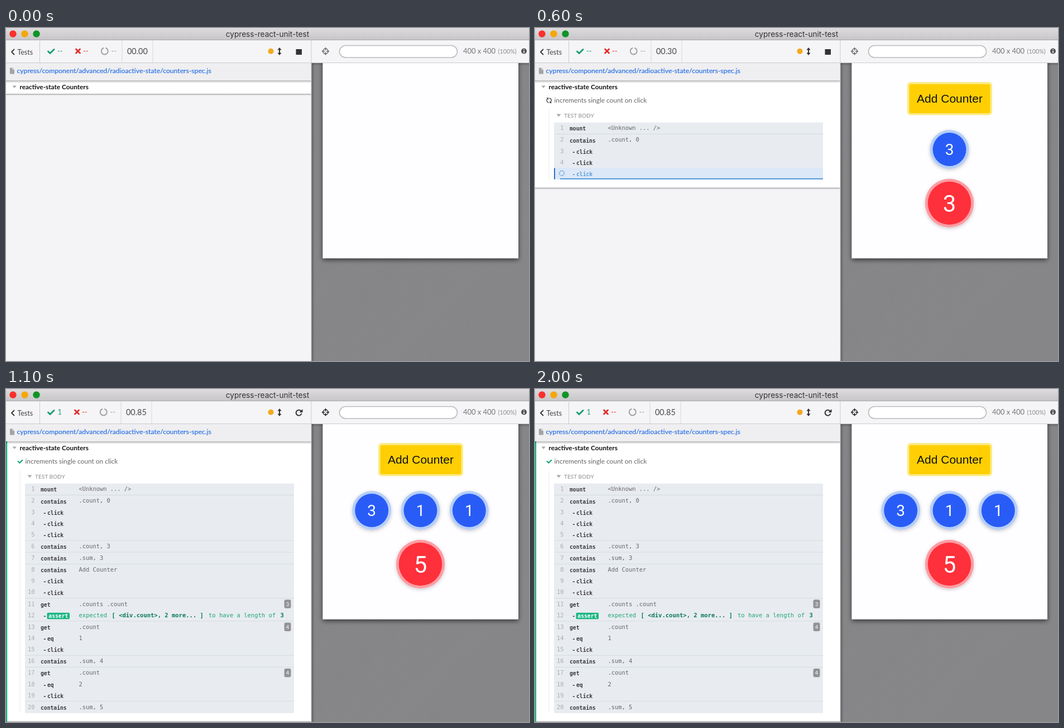
These frames come from a looping animation (937 px wide and 598 px high, 2100 ms). An HTML page:

```html
<!DOCTYPE html>
<html lang="en">
<head>
<meta charset="utf-8">
<title>Component test run</title>
<style>
  html, body { margin: 0; width: 100%; height: 100%; overflow: hidden; background: #f4f3f6; }
  svg { display: block; font-family: Lato, sans-serif; }
  .mono { font-family: "DejaVu Sans Mono", monospace; }
  .app { font-family: "Liberation Sans", Arial, sans-serif; }
  .digit { font-family: Roboto, sans-serif; }
  .title { font-family: Inter, sans-serif; }
  .bold { font-weight: 700; }
  .mid { text-anchor: middle; }
  .end { text-anchor: end; }
  .line { fill: none; stroke-linecap: round; stroke-linejoin: round; }
</style>
</head>
<body>
<svg width="937" height="598" viewBox="0 0 937 598">
  <defs>
    <linearGradient id="bar" x2="0" y2="1"><stop stop-color="#dedcde"/><stop offset="1" stop-color="#c6c4c6"/></linearGradient>
    <linearGradient id="fade" x2="0" y2="1"><stop stop-opacity=".28"/><stop offset="1" stop-opacity="0"/></linearGradient>
    <linearGradient id="side"><stop stop-opacity=".3"/><stop offset="1" stop-opacity="0"/></linearGradient>
    <pattern id="stripes" width="2.83" height="2.83" patternUnits="userSpaceOnUse" patternTransform="rotate(45)">
      <rect width="3" height="3" fill="#8f8e90"/><rect width="1.3" height="3" fill="#7b7a7c"/>
    </pattern>
    <filter id="soft" x="-20%" y="-20%" width="140%" height="140%"><feDropShadow dx="0" dy="2" stdDeviation="3" flood-opacity=".2"/></filter>
    <filter id="deep" x="-10%" y="-10%" width="120%" height="120%"><feDropShadow dx="0" dy="3" stdDeviation="4" flood-opacity=".6"/></filter>
  </defs>
  <rect width="937" height="598" fill="#f4f3f6"/>
  <rect x="547" y="62" width="390" height="536" fill="url(#stripes)"/>
  <rect x="547" y="62" width="6" height="536" fill="url(#side)"/>
  <rect x="547" y="62" width="390" height="6" fill="url(#fade)"/>
  <rect x="567.5" y="50" width="350.5" height="363.5" fill="#fefdff" filter="url(#deep)"/>
  <g id="log"></g>
  <rect y="63" width="546.5" height="31" fill="#efeef0"/>
  <rect y="94" width="546.5" height="5" fill="url(#fade)"/>
  <path d="M7 71.5h5l3 3v8H7z" fill="#a2a1a3"/><path d="M12 71.5v3h3" stroke="#efeef0" fill="none"/>
  <text x="19.5" y="81" font-size="12.2" fill="#2770e6" stroke="#2770e6" stroke-width=".2">cypress/component/advanced/radioactive-state/counters-spec.js</text>

  <rect y="22" width="937" height="40.5" fill="#f5f4f6"/>
  <path d="M0 62.5H937M60.5 23V62M547 22V598" stroke="#cbcacc"/>
  <rect width="937" height="22" fill="url(#bar)"/>
  <path d="M0 21.5H937" stroke="#aaa8aa"/>
  <circle cx="12.5" cy="10.5" r="6.2" fill="#fb2f2b"/>
  <circle cx="33.5" cy="10.5" r="6.2" fill="#f5a70a"/>
  <circle cx="54.5" cy="10.5" r="6.2" fill="#0f9427"/>
  <text class="title mid" x="468.5" y="15.5" font-size="13.6" fill="#333">cypress-react-unit-test</text>
  <path class="line" d="M14.5 38.5l-4.5 4.5 4.5 4.5" stroke="#333" stroke-width="1.8"/>
  <text x="20.5" y="47.5" font-size="12.4" fill="#444">Tests</text>
  <circle cx="474.5" cy="41.8" r="5" fill="#f3a91d"/>
  <path d="M490 37V47" stroke="#333" stroke-width="2"/>
  <path d="M490 35l3.6 4.5h-7.2zM490 49l3.6-4.5h-7.2z" fill="#333"/>
  <rect x="597.5" y="31.5" width="211" height="21.5" rx="10.75" fill="#fff" stroke="#bbbabc" stroke-width="1.5"/>
  <text x="819" y="45.5" font-size="12.9" fill="#77767a">400 x 400</text>
  <text x="881.5" y="45.5" font-size="10.8" fill="#8d8c90">(100%)</text>
  <circle cx="928" cy="41.5" r="5" fill="#555"/>
  <path d="M928 38v1.5M928 41v4" stroke="#fff" stroke-width="1.6"/>
  <g id="tools"></g>
  <g id="page"></g>
</svg>
<script>
const $ = id => document.getElementById(id);
const STEP = 100, LOOP = 2100, DONE = 11;

// first step, visible log rows, timer, counters
const STATES = [
  [0, 0, '00.00', []],
  [1, 3, '00.10', [1]],
  [4, 4, '00.10', [2]],
  [6, 5, '00.30', [3]],
  [7, 9, '00.40', [3, 0]],
  [8, 10, '00.50', [3, 0, 0]],
  [9, 15, '00.60', [3, 1, 0]],
  [10, 19, '00.70', [3, 1, 1]],
  [DONE, 20, '00.85', [3, 1, 1]]
];

// command, message, badge; a leading dash marks a child command
const ROWS = [
  ['mount', '<Unknown ... />'], ['contains', '.count, 0'],
  ['-click'], ['-click'], ['-click'],
  ['contains', '.count, 3'], ['contains', '.sum, 3'],
  ['contains', 'Add Counter'], ['-click'], ['-click'],
  ['get', '.counts .count', 3], ['-assert'],
  ['get', '.count', 4], ['-eq', '1'], ['-click'],
  ['contains', '.sum, 4'],
  ['get', '.count', 4], ['-eq', '2'], ['-click'],
  ['contains', '.sum, 5']
];

const esc = s => String(s).replace(/</g, '&lt;');
const text = (x, y, s, size, fill, cls = '') =>
  `<text x="${x}" y="${y}" font-size="${size}" fill="${fill}" class="${cls}">${esc(s)}</text>`;
const rect = (x, y, w, h, fill, rx = 0) =>
  `<rect x="${x}" y="${y}" width="${w}" height="${h}" rx="${rx}" fill="${fill}"/>`;
const path = (d, stroke, width, extra = '') =>
  `<path class="line" d="${d}" stroke="${stroke}" stroke-width="${width}" ${extra}/>`;

let centre = 159.87;
const centres = ROWS.map(([name], i) => centre += 20.13 + (i && name[0] !== '-' ? 1 : 0));

function assertion(y) {
  const plain = (x, s) => text(x, y, s, 10.5, '#1fa473', 'mono');
  const strong = (x, s) => text(x, y, s, 10.5, '#087a55', 'mono bold');
  return plain(130.5, 'expected') + strong(189.5, '[ <div.count>, 2 more... ]') +
    plain(363, 'to have a length of') + strong(491.5, '3');
}

function row(i, pending, spin) {
  const [name, message, badge] = ROWS[i], y = centres[i];
  const child = name[0] === '-', label = child ? name.slice(1) : name;
  const ink = pending ? '#5b9bdc' : '#3a3a3e';
  let out = rect(34, y - 10.3, 482, 20.8, pending ? '#dce8f7' : '#e8ecf0');
  if (i && !child) out += path(`M34.5 ${y - 10.6}H515.5`, '#d3dade', 1);
  if (pending) {
    out += rect(34, y - 10, 2, 20.2, '#2f6fc9') + rect(45, y + 8.4, 471, 1.8, '#478fda') +
      `<circle cx="48" cy="${y - .8}" r="4.3" fill="none" stroke="#4c8fd6" stroke-width="1.7" stroke-dasharray="1.7 1.68" transform="rotate(${spin} 48 ${y - .8})"/>`;
  } else out += text(51.5, y + 3.3, i + 1, 10.4, '#a9adb3', 'mono end');
  if (child) out += text(66.5, y + 4.3, '-', 9.7, ink, 'mono bold');
  if (label === 'assert') {
    out += rect(73.5, y - 4.6, 40.5, 11.4, '#19b681', 2) +
      text(76.3, y + 4.4, label, 9.7, '#fff', 'mono bold') + assertion(y + 3.5);
  } else out += text(child ? 74 : 62, y + 4.4, label, 9.7, ink, 'mono bold');
  if (message) out += text(130.5, y + 3.3, message, 10.4, '#67676c', 'mono');
  if (badge) out += rect(498.5, y - 8, 12, 15.5, '#939397', 3) + text(504.5, y + 3.3, badge, 9.5, '#fff', 'mid');
  return out;
}

function drawLog(count, done, spin) {
  const last = count ? centres[count - 1] : 0, bottom = count ? last + 25.5 : 118.5;
  let out = rect(0, 94, 546.5, bottom - 94, '#fff') + rect(0, bottom, 546.5, 3, 'url(#fade)') +
    path(`M0 ${bottom}H546`, '#b9b8bb', 1) +
    '<path d="M11.5 103.5h7.4l-3.7 4.6z" fill="#aaa"/>' +
    text(24.5, 109.5, 'reactive-state Counters', 11.8, '#111', 'bold');
  if (!count) return out;
  out += text(34.5, 134, 'increments single count on click', 11.9, '#65656a') +
    '<path d="M38.5 154.5h8l-4 5z" fill="#aaa"/>' +
    text(52, 161, 'TEST BODY', 10.1, '#8f8f94') +
    path(`M25 147V${last + 10}`, '#cfced2', 1, 'stroke-dasharray=".1 2.2"');
  if (done) out += rect(0, 94, 2.2, 504, '#14b87d') + path('M21.7 130l2.8 2.8 4.8-5', '#14a873', 2.2);
  else out += `<g transform="translate(25.2 130) rotate(${spin})">` +
    path('M-4 -1A4.1 4.1 0 0 1 3.3 -2.4M4 1A4.1 4.1 0 0 1 -3.3 2.4', '#55555a', 1.5) +
    '<path d="M5 -5v4H1zM-5 5V1h4z" fill="#55555a"/></g>';
  for (let i = 0; i < count; i++) out += row(i, !done && i === count - 1, spin);
  return out;
}

function drawTools(time, done) {
  const x = done ? -2 : 0, aim = done ? '#222' : '#66656a';
  return path('M75.5 42l3.5 3.5 7-7', '#1a9f70', 3) +
    (done ? text(92.5, 46, 1, 13, '#1a9f70') : text(92, 45.5, '--', 13, '#1a9f70')) +
    `<g transform="translate(${x})">` +
    path('M125.5 38l7 7M132.5 38l-7 7', '#e02c2c', 2.8) + text(138, 45.5, '--', 13, '#e02c2c') +
    path('M179 36A6 6 0 1 1 174.5 36', '#a09fa3', 2) + text(188.5, 45.5, '--', 13, '#a09fa3') +
    path('M208 23V62M263 23V62', '#d8d7d9', 1) + text(217, 46.5, time, 14.4, '#4a4a4e') + '</g>' +
    (done ? path('M528.5 39.5A5 5 0 1 0 529.3 44.5', '#333', 2) + '<path d="M531.5 36v6h-6z" fill="#333"/>'
          : rect(519.5, 38, 10.5, 10, '#333')) +
    path('M572.5 35.5v4M572.5 44v4M566.5 41.7h4M574.5 41.7h4', aim, 1.6) +
    `<circle cx="572.5" cy="41.7" r="4.6" fill="none" stroke="${aim}" stroke-width="1.5"/>`;
}

const disc = (x, y, r, edge, fill, rim, n, size) =>
  `<circle cx="${x}" cy="${y}" r="${r + edge}" fill="${rim}" filter="url(#soft)"/>` +
  `<circle cx="${x}" cy="${y}" r="${r}" fill="${fill}"/>` +
  text(x, y + size * .36, n, size, '#fff', 'digit mid');

function drawPage(counts) {
  if (!counts.length) return '';
  const x = 742.5, sum = counts.reduce((a, b) => a + b);
  return '<rect x="667" y="97" width="152" height="59.5" rx="6" fill="#fceb83"/>' +
    rect(670.5, 101, 145, 52, '#ffcf03', 3) +
    text(x + .5, 134, 'Add Counter', 21, '#111', 'app mid') +
    counts.map((n, i) => disc(x + 87.3 * (i - (counts.length - 1) / 2), 218, 30, 5, '#295cf7', '#b5cef8', n, 28)).join('') +
    disc(x, 314.5, 38.8, 4.9, '#fd303b', '#fd9ca3', sum, 42);
}

let shown = -1;
function frame(now) {
  const step = Math.floor(now % LOOP / STEP);
  if (step !== shown) {
    shown = step;
    const [, count, time, counts] = STATES.filter(s => s[0] <= step).pop();
    const done = step >= DONE, spin = (step - 1) * 18;
    $('log').innerHTML = drawLog(count, done, spin);
    $('tools').innerHTML = drawTools(time, done);
    $('page').innerHTML = drawPage(counts);
  }
  requestAnimationFrame(frame);
}
frame(0);
</script>
</body>
</html>
```
